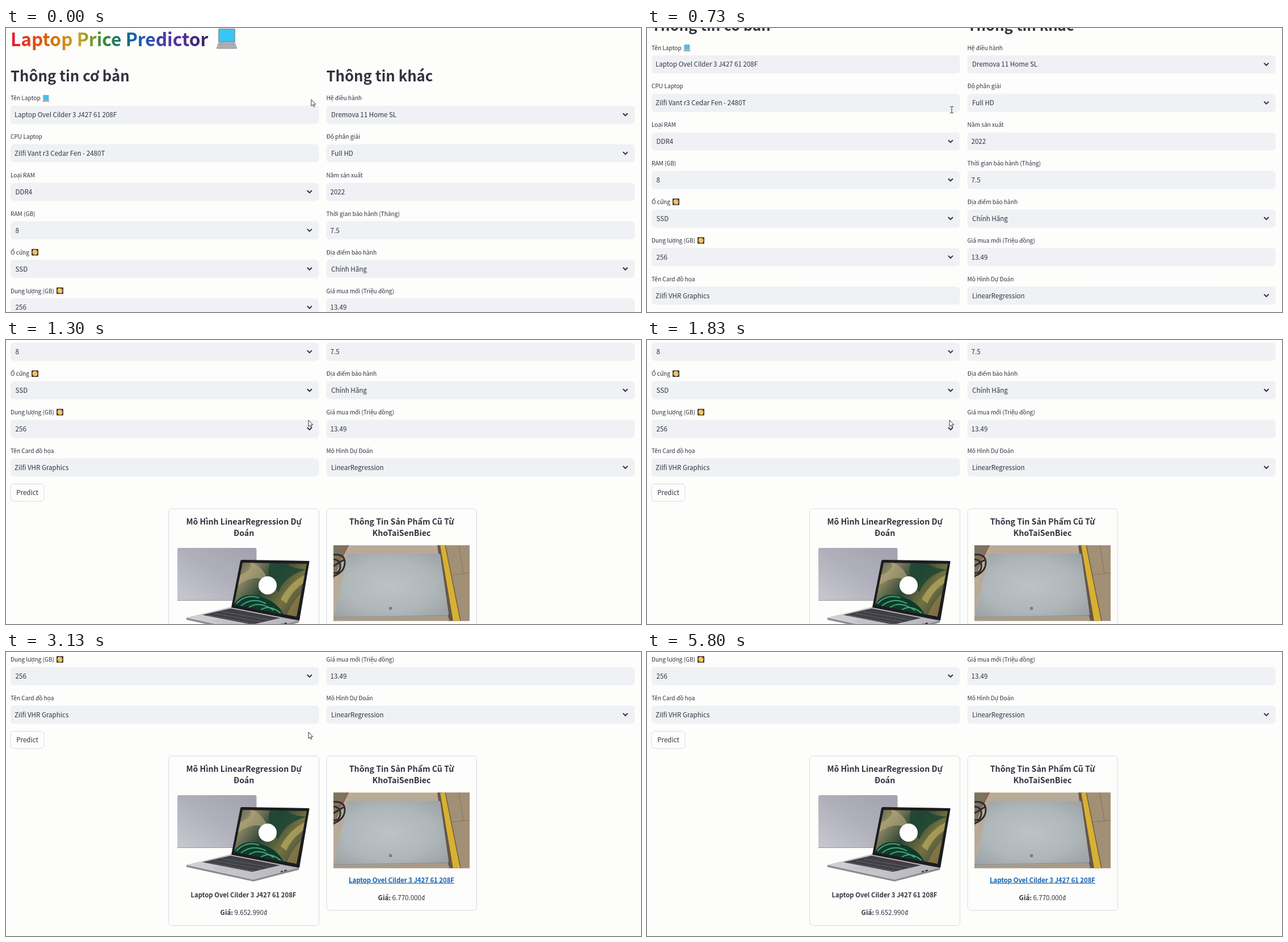
Write an HTML page that moves like this. It is 1119x500 px and loops after 5.83 s.

```html
<!DOCTYPE html>
<html lang="vi">
<head>
<meta charset="utf-8">
<title>Laptop Price Predictor</title>
<style>
  html, body { margin: 0; width: 100%; height: 100%; overflow: hidden; background: #fdfdfc; }
  svg { display: block; width: 100vw; height: 100vh; }
  text {
    font-family: "Noto Sans CJK JP", "Noto Sans CJK SC", "Noto Sans CJK", "Noto Sans", sans-serif;
    font-size: 11.57px; fill: #31333f; white-space: pre;
  }
  .title { font-size: 31.7px; font-weight: 700; fill: url(#rainbow); }
  .head { font-size: 25.7px; font-weight: 600; }
  .label { font-size: 10.13px; }
  .card { font-size: 14.15px; font-weight: 600; text-anchor: middle; }
  .name { font-size: 11.3px; font-weight: 600; text-anchor: middle; }
  .link { fill: #1260b4; text-decoration: underline; }
  .price { text-anchor: middle; }
  .price tspan { font-weight: 600; }
  .frame { fill: none; stroke: #d8d9e0; }
</style>
</head>
<body>
<svg viewBox="0 0 1119 500" preserveAspectRatio="none">
  <defs>
    <linearGradient id="rainbow" gradientUnits="userSpaceOnUse" x1="8" x2="357" y1="0" y2="0">
      <stop offset="0" stop-color="#ee1438"/>
      <stop offset=".17" stop-color="#d9600a"/>
      <stop offset=".34" stop-color="#cfa51f"/>
      <stop offset=".48" stop-color="#2b8a3c"/>
      <stop offset=".64" stop-color="#0f5fb4"/>
      <stop offset=".82" stop-color="#5a2fa6"/>
      <stop offset="1" stop-color="#36265f"/>
    </linearGradient>
    <linearGradient id="lid" x1="0" y1="1" x2="1" y2="0">
      <stop offset="0" stop-color="#c8c8d1"/>
      <stop offset=".5" stop-color="#b0b0bb"/>
      <stop offset="1" stop-color="#a2a2ae"/>
    </linearGradient>
    <linearGradient id="wall" x1="0" y1="0" x2="1" y2=".6">
      <stop offset="0" stop-color="#4c5747"/>
      <stop offset=".25" stop-color="#8f8763"/>
      <stop offset=".5" stop-color="#2c4536"/>
      <stop offset=".75" stop-color="#75713f"/>
      <stop offset="1" stop-color="#3c4a43"/>
    </linearGradient>
    <radialGradient id="silver" cx=".48" cy=".5" r=".65">
      <stop offset="0" stop-color="#bcc3c6"/>
      <stop offset=".6" stop-color="#b0b7ba"/>
      <stop offset="1" stop-color="#9ca3a5"/>
    </radialGradient>
    <linearGradient id="deck" x1="0" y1="0" x2="1" y2="0">
      <stop offset="0" stop-color="#d2d2d6"/>
      <stop offset="1" stop-color="#b4b4ba"/>
    </linearGradient>
    <clipPath id="screen"><path d="M417 278L530 280 512 373 402 352z"/></clipPath>
    <clipPath id="photo"><rect x="577" y="247.5" width="240" height="133"/></clipPath>
    <g id="laptop">
      <rect x="3" y="0" width="30" height="24" rx="1.5" fill="#8f969b"/>
      <rect x="4.5" y="1.5" width="27" height="20.5" fill="#38c6f4"/>
      <path d="M3 24h30l3 9v2H0v-2z" fill="#b9bcc0"/>
      <path d="M4.5 26h27M3.7 28.5h28.6M3 31h30" stroke="#85898e" stroke-width="1.2" stroke-dasharray="2 .6"/>
      <path d="M0 33.5h36v2H0z" fill="#94989c"/>
    </g>
    <g id="disc">
      <rect width="12" height="11.5" rx="1" fill="#39363f"/>
      <circle cx="6" cy="5.8" r="4.7" fill="#f2b632"/>
      <path d="M6 5.8L2.3 2.9 4.2 1.5zM6 5.8l3.7 2.9-1.9 1.4z" fill="#ffe49a"/>
      <circle cx="6" cy="5.8" r="1.5" fill="#fff"/>
      <circle cx="6" cy="5.8" r=".7" fill="#39363f"/>
    </g>
  </defs>

  <g id="page">
    <text class="title" x="8" y="31.5">Laptop Price Predictor</text>
    <use href="#laptop" x="371" y="1"/>
    <text class="head" x="8" y="94">Thông tin cơ bản</text>
    <text class="head" x="564.5" y="94">Thông tin khác</text>
    <g id="form"></g>
    <use href="#laptop" transform="translate(64.5 118) scale(.33)"/>
    <use href="#disc" x="45" y="389"/>
    <use href="#disc" x="89" y="456.8"/>

    <rect class="frame" x="8" y="589" width="59" height="30.5" rx="6"/>
    <text x="37.5" y="608.6" text-anchor="middle">Predict</text>

    <g transform="translate(0 449.5)">
      <rect class="frame" x="286.5" y="183" width="265" height="298.5" rx="6"/>
      <text class="card" x="419" y="211.3">Mô Hình LinearRegression Dự</text>
      <text class="card" x="419" y="230.8">Đoán</text>
      <path d="M303 252h137l1.5 2v91H302v-91z" fill="url(#lid)"/>
      <path d="M302 344.5h100" stroke="#9b9894" stroke-width="1.2"/>
      <path d="M318 375L397 356 516 380V383.5L436 404 318 378.5z" fill="#8b8b92"/>
      <path d="M318 375L397 356 516 380 436 401z" fill="url(#deck)"/>
      <path d="M346 370L396 358.500 483 375.500 434 387z" fill="#3f3f45"/>
      <path d="M355 370.500L438 385.500M368 367.500L451 382.500M382 364.500L466 379" stroke="#77777f" stroke-width=".8" stroke-dasharray="4 1"/>
      <path d="M361 380L382 377 407 383 388 388z" fill="#c2c2c8"/>
      <path d="M484 387l4-1M490 385.500l5-1.200" stroke="#303036" stroke-width="2"/>
      <path d="M416 273L533 275Q535 275 534.500 277L517 380 397 357 413 275Q413.500 273 416 273z" fill="#1b1c20"/>
      <g clip-path="url(#screen)">
        <path d="M395 270h145v115H395z" fill="url(#wall)"/>
        <path d="M428 276Q455 284 462 312 440 296 408 318L412 300Q440 288 428 276z" fill="#b8ab80" opacity=".6"/>
        <path d="M466 276Q455 300 480 330 492 300 530 290 500 288 490 276z" fill="#1f4634" opacity=".85"/>
        <path d="M484 342Q500 312 530 298V310Q504 326 494 350z" fill="#b9ab62" opacity=".7"/>
        <path d="M494 372Q506 342 530 322V380z" fill="#a08545" opacity=".6"/>
        <path d="M400 354Q415 328 445 337 480 346 490 372z" fill="#0e3a2c"/>
        <path d="M406 350Q424 332 446 340M414 354Q434 338 458 350M428 357Q446 344 472 362M448 362Q464 350 484 367"
          fill="none" stroke="#47a877" stroke-width="2"/>
      </g>
      <circle cx="461" cy="318" r="16" fill="#fff"/>
      <text class="name" x="418.5" y="432.2">Laptop Ovel Cilder 3 J427 61 208F</text>
      <text class="price" x="419" y="463.3"><tspan>Giá:</tspan> 9.652.990₫</text>

      <rect class="frame" x="565" y="183" width="264.5" height="272" rx="6"/>
      <text class="card" x="697" y="211.3">Thông Tin Sản Phẩm Cũ Từ</text>
      <text class="card" x="697" y="230.8">KhoTaiSenBiec</text>
      <g clip-path="url(#photo)">
        <path d="M577 247h240v134H577z" fill="#b9aa97"/>
        <path d="M577 247h27l-10 20-17 40z" fill="#7d735f"/>
        <path d="M603 247l-10 20-16 8" fill="none" stroke="#9c564c" stroke-width="2"/>
        <path d="M577 264q20-2 20 14t-20 24M577 272q14 2 12 14t-12 10M577 284l20-12" fill="none" stroke="#2c2d30" stroke-width="3"/>
        <path d="M760 247h10l28 134h-20z" fill="#64564a"/>
        <path d="M774 247h43v134h-16z" fill="#a18f76"/>
        <path d="M780 300l37-4M798 247l8 50" stroke="#85755f"/>
        <path d="M765 247h9l27 134h-13z" fill="#d6b133"/>
        <path d="M774 247l27 134" stroke="#71603b" stroke-width="1.5"/>
        <path d="M577 372l201-2 4 11H577z" fill="#a99a85"/>
        <path d="M606 262H762Q765 262 765.5 265L780 368Q780 372 776 372L581 376Q577 376 578 372L602 265Q603 262 606 262z" fill="url(#silver)"/>
        <path d="M578 374.5L779 371" stroke="#858888" stroke-width="1.2"/>
        <rect x="675" y="356" width="5" height="5" fill="#777d80"/>
      </g>
      <text class="name link" x="697" y="405.7">Laptop Ovel Cilder 3 J427 61 208F</text>
      <text class="price" x="697" y="436.8"><tspan>Giá:</tspan> 6.770.000₫</text>
    </g>
  </g>

  <g id="cursor">
    <path id="arrow" d="M0 0V11.3L2.6 8.9 4.3 12.6 6 11.800 4.400 8.200H7.800z" fill="#fff" stroke="#222" stroke-width=".9"/>
    <path id="beam" d="M-3-5.500h2.200L0-4.800.800-5.500H3M0-4.800V4.800M-3 5.500h2.200L0 4.800.800 5.500H3" fill="none" stroke="#333"/>
  </g>
</svg>
<script>
const LOOP = 5830, CURSOR_OFF = 5300;
const PITCH = 67.85, BOX_TOP = 136.7, BOX_H = 32;
const $ = id => document.getElementById(id);

// [label, value, kind]
const left = [
  ["Tên Laptop", "Laptop Ovel Cilder 3 J427 61 208F", "text"],
  ["CPU Laptop", "Zilfi Vant r3 Cedar Fen - 2480T", "text"],
  ["Loại RAM", "DDR4", "select"],
  ["RAM (GB)", "8", "select"],
  ["Ổ cứng", "SSD", "select"],
  ["Dung lượng (GB)", "256", "select"],
  ["Tên Card đồ họa", "Zilfi VHR Graphics", "text"]
];
const right = [
  ["Hệ điều hành", "Dremova 11 Home SL", "select"],
  ["Độ phân giải", "Full HD", "select"],
  ["Năm sản xuất", "2022", "text"],
  ["Thời gian bảo hành (Tháng)", "7.5", "text"],
  ["Địa điểm bảo hành", "Chính Hãng", "select"],
  ["Giá mua mới (Triệu đồng)", "13.49", "text"],
  ["Mô Hình Dự Đoán", "LinearRegression", "select"]
];

function field(x, i, [label, value, kind]) {
  const y = BOX_TOP + i * PITCH, select = kind === "select";
  const chevron = select
    ? `<path d="M${x + 522.8} ${y + 13.6}l4.1 4.1 4.1-4.1" fill="none" stroke="#31333f" stroke-width="2"/>` : "";
  return `<text class="label" x="${x}" y="${y - 9.4}">${label}</text>
    <rect x="${x}" y="${y}" width="543.5" height="${BOX_H}" rx="6" fill="#eff1f4"/>
    <text x="${x + (select ? 8.6 : 7)}" y="${y + 20.4}">${value}</text>${chevron}`;
}
$("form").innerHTML =
  left.map((f, i) => field(8, i, f)).join("") +
  right.map((f, i) => field(564.5, i, f)).join("");

function ease(t, start, length) {
  const u = Math.min(1, Math.max(0, (t - start) / length));
  return u * u * (3 - 2 * u);
}

function overInput(y) {
  return left.some(([, , kind], i) => {
    const top = BOX_TOP + i * PITCH;
    return kind === "text" && y >= top && y <= top + BOX_H;
  });
}

function show(id, visible) {
  $(id).style.display = visible ? "" : "none";
}

function draw(t) {
  const scroll = 335.5 * ease(t, 549, 540) + 114 * ease(t, 2530, 300);
  const reach = ease(t, 120, 400), settle = ease(t, 740, 460);
  const x = 538 - reach - 4 * settle;
  const y = 126 + 18 * reach - 3 * settle;
  const beam = overInput(y + scroll);
  $("page").setAttribute("transform", `translate(0 ${-scroll})`);
  $("cursor").setAttribute("transform", `translate(${x} ${y})`);
  show("cursor", t < CURSOR_OFF);
  show("arrow", !beam);
  show("beam", beam);
}

const begin = performance.now();
function tick(now) {
  draw(Math.max(0, now - begin) % LOOP);
  requestAnimationFrame(tick);
}
draw(0);
requestAnimationFrame(tick);
</script>
</body>
</html>
```
